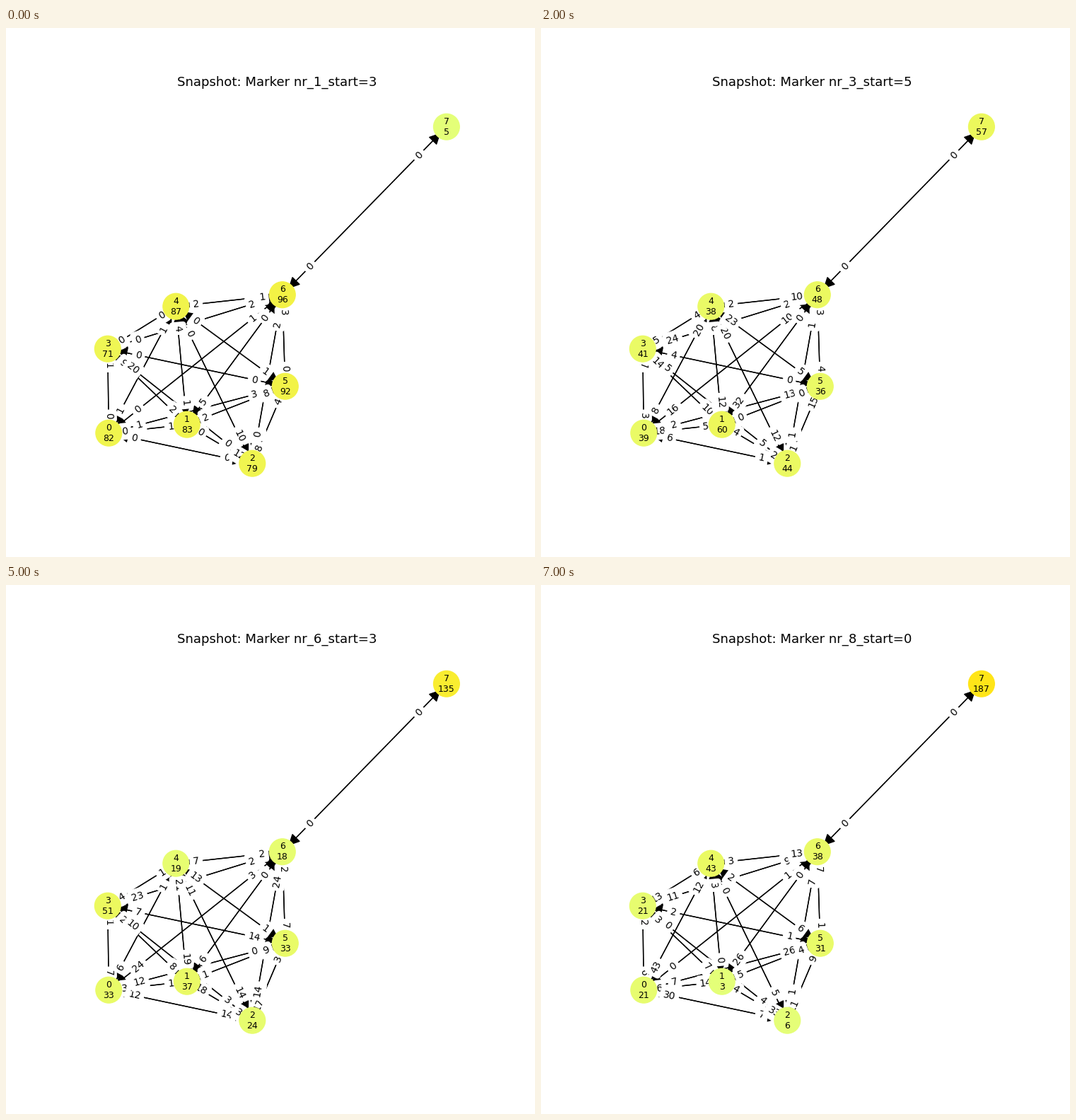
Animation, 748 px wide and 748 px high, one loop 8000 ms. Source, as a matplotlib script:

```python
from itertools import combinations
import math

import matplotlib.pyplot as plt
from matplotlib.animation import FuncAnimation
from matplotlib.patches import FancyArrowPatch
import numpy as np

SIZE, DPI = 748, 100
TOTAL = 700             # tokens in the whole network
LABEL_POS = 0.15
SHRINK = math.sqrt(300) / 2

POS = [(145.3, 572.7), (255.8, 560.7), (348.3, 615.7), (143.8, 453.7),
       (240.3, 393.7), (394.8, 506.7), (390.8, 377.2), (622.9, 139.7)]
CORE = 7                # nodes that trade with each other
EDGES = list(combinations(range(CORE), 2)) + [(6, 7)]
STARTS = [3, 5, 5, 5, 3, 3, 0, 0]


def split(rng, amount, parts, evenness):
    """Share whole tokens at random; high evenness gives similar parts."""
    return rng.multinomial(amount, rng.dirichlet([evenness] * parts))


def snapshot(i):
    """Tokens held by each node and on both directions of each edge."""
    rng = np.random.default_rng(40 + i)
    sink = 5 + 26 * i
    moving = min(105 + 116 * i, 350)
    nodes = split(rng, TOTAL - sink - moving, CORE, 50 / (1 + 4 * i))
    channels = split(rng, moving, 2 * len(EDGES) - 2, 0.9)
    return [*nodes, sink], [*channels, 0, 0]


fig = plt.figure(figsize=(SIZE / DPI, SIZE / DPI), dpi=DPI, facecolor="white")
ax = fig.add_axes([0, 0, 1, 1])
ax.set_xlim(0, SIZE)
ax.set_ylim(SIZE, 0)
ax.axis("off")


def add_arrow(a, b):
    ax.add_patch(FancyArrowPatch(
        POS[a], POS[b], arrowstyle="-|>", mutation_scale=25, lw=1,
        shrinkA=SHRINK, shrinkB=SHRINK, color="black", zorder=1))


def add_label(a, b):
    """Count on the edge, close to node a and turned along the line."""
    (x1, y1), (x2, y2) = POS[a], POS[b]
    dx, dy = x2 - x1, y2 - y1
    length = math.hypot(dx, dy)
    t = (SHRINK + LABEL_POS * (length - 2 * SHRINK)) / length
    angle = math.degrees(math.atan2(-dy, dx))
    if angle > 90:
        angle -= 180
    elif angle < -90:
        angle += 180
    return ax.text(x1 + t * dx, y1 + t * dy, "", size=10, rotation=angle,
                   ha="center", va="center", zorder=1,
                   bbox=dict(boxstyle="round", ec="white", fc="white"))


labels = []
for a, b in EDGES:
    add_arrow(a, b)
    add_arrow(b, a)
for a, b in EDGES:
    labels += [add_label(a, b), add_label(b, a)]

dots = ax.scatter(*zip(*POS), s=700, c=[0] * len(POS), cmap="Wistia",
                  vmin=0, vmax=TOTAL, zorder=2)
names = [ax.text(x, y, "", size=9, ha="center", va="center", zorder=3)
         for x, y in POS]
title = ax.text(0.5125 * SIZE, 81.4, "", size=13.1, ha="center",
                va="baseline")


def draw(i):
    nodes, channels = snapshot(i)
    title.set_text(f"Snapshot: Marker nr_{i + 1}_start={STARTS[i]}")
    dots.set_array(nodes)
    for k, (name, value) in enumerate(zip(names, nodes)):
        name.set_text(f"{k}\n{value}")
    for label, count in zip(labels, channels):
        label.set_text(str(count))
    return [title, dots, *names, *labels]


anim = FuncAnimation(fig, draw, frames=len(STARTS), interval=1000,
                     repeat=True, repeat_delay=0, blit=False)
plt.show()
```
